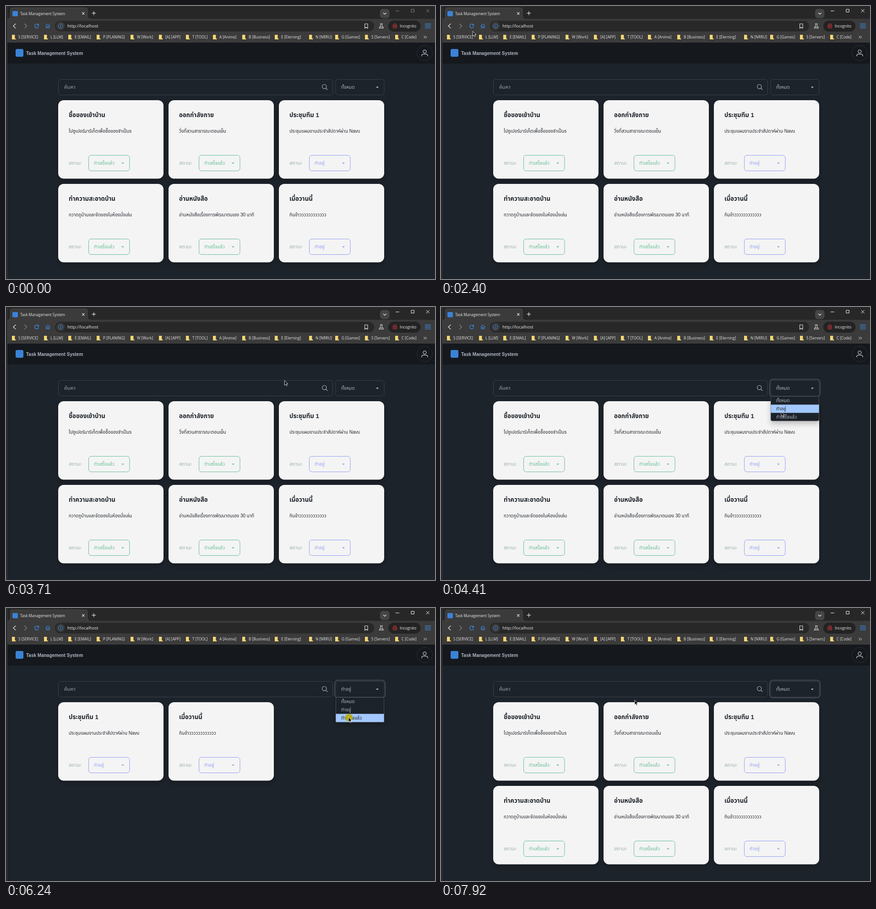
An HTML page that plays this animation: 937 by 597 pixels, repeating every 7.99 s.

```html
<!DOCTYPE html>
<html lang="th">
<head>
<meta charset="utf-8">
<title>Task board</title>
<style>
  html, body { margin: 0; width: 100%; height: 100%; overflow: hidden; background: #1d232a; }
  svg { display: block; width: 937px; height: 597px; }
  text { font-family: "Liberation Sans", "Noto Sans Thai Looped", "Noto Sans Thai", "Noto Sans", sans-serif; white-space: pre; }
  .ui { font-family: "Open Sans", "Noto Sans", sans-serif; }
  .line { fill: none; stroke-linecap: round; stroke-linejoin: round; }
</style>
</head>
<body>
<svg id="stage" viewBox="0 0 937 597" xmlns="http://www.w3.org/2000/svg">
  <defs>
    <filter id="soft" x="-20%" y="-20%" width="140%" height="150%">
      <feDropShadow dx="0" dy="6" stdDeviation="6" flood-color="#000" flood-opacity=".22"/>
    </filter>
  </defs>
</svg>
<script>
const LOOP = 7990;
const DONE = 'ทำเสร็จแล้ว', DOING = 'ทำอยู่', ALL = 'ทั้งหมด';
const OPTIONS = [ALL, DOING, DONE];
const stage = document.getElementById('stage');

function el(tag, attrs, parent = stage) {
  const node = document.createElementNS('http://www.w3.org/2000/svg', tag);
  for (const key in attrs) node.setAttribute(key, attrs[key]);
  parent.appendChild(node);
  return node;
}
const group = (parent) => el('g', {}, parent);
const rect = (x, y, width, height, rx, fill, parent, extra = {}) =>
  el('rect', { x, y, width, height, rx, fill, ...extra }, parent);
const path = (d, stroke, width, parent, extra = {}) =>
  el('path', { d, stroke, 'stroke-width': width, class: 'line', ...extra }, parent);
const circle = (cx, cy, r, fill, parent, extra = {}) =>
  el('circle', { cx, cy, r, fill, ...extra }, parent);
function text(str, x, y, size, fill, parent, extra = {}) {
  const node = el('text', { x, y, 'font-size': size, fill, ...extra }, parent);
  node.textContent = str;
  return node;
}
const show = (node, on) => node.setAttribute('display', on ? 'inline' : 'none');
const caret = (x, y, fill, parent) =>
  el('path', { d: `M${x - 3} ${y}h6l-3 3z`, fill }, parent);

// Browser window
const UI = { class: 'ui' };
const BLUE = '#3b8be6', PALE = '#e4e4e4';
rect(0, 0, 937, 597, 0, '#1d232a');
rect(0, 0, 937, 29, 0, '#272727');
rect(0, 28, 937, 52, 0, '#3b3b3b');
el('path', { d: 'M4 28.5Q9.5 28 9.5 22V9q0-5 5-5H173q5 0 5 5V22q0 6 6 6.5z', fill: '#3b3b3b', stroke: '#565656', 'stroke-width': .7 });
rect(3, 28.3, 934, 2, 0, '#3b3b3b');
rect(14, 11, 12, 11.5, 2, '#3b82d6');
text('Task Management System', 31, 19.8, 8.1, '#ececec', stage, UI);
path('M166.5 14l4.6 4.6m0-4.6l-4.6 4.6', PALE, 1.1);
path('M188 15.7h7.6m-3.8-3.8v7.6', PALE, 1.2);
rect(817, 6.5, 20.5, 20, 6, '#454545');
path('M824.4 15.2l2.9 2.8 2.9-2.8', PALE, 1.3);
const caption = path('M851.5 10.8h7M885.4 7.2h6v6h-6zM918 7.2l6.4 6.4m0-6.4l-6.4 6.4', '#fff', 1);

path('M21 39l-5 4.7 5 4.7', PALE, 1.3);
path('M40.5 39l5 4.7-5 4.7', '#858585', 1.2);
const reloadHover = circle(67, 43.7, 11.3, '#717171');
const reloadIcon = path('M70.7 41.4a4.3 4.3 0 1 0 .5 3.5M71.2 39.5v2.8h-2.8', BLUE, 1.3);
const stopIcon = path('M63.8 40.4l6.6 6.6m0-6.6l-6.6 6.6', BLUE, 1.3);
path('M87 43.2l4.4-4 4.4 4M88 42.6v5.4h2.2v-3.2h2.4V48h2.2v-5.4', BLUE, 1.1);
rect(107, 32.5, 697, 23, 11.5, '#282828');
circle(119.3, 43.8, 9.2, '#3a3a3a');
circle(119.3, 43.8, 4.7, 'none', stage, { stroke: BLUE, 'stroke-width': 1 });
path('M119.3 43.4v2.4M119.3 41.5v.1', BLUE, 1.1);
text('http://localhost', 134, 47.2, 9.5, '#f1f1f1', stage, UI);
path('M783.6 39h6.4v10l-3.2-2.6-3.2 2.6z', PALE, 1.1);
path('M817.3 39h5M818.3 39v3.8l-3.5 5.6h10l-3.5-5.6V39M816.5 45.7h6.6', PALE, 1);
rect(835, 32, 70.5, 24, 12, '#232323');
path('M844.2 43.3h10.2M846 43l1-3.6h4.6l1 3.6z', '#d3333c', 1.1);
circle(846.7, 46.8, 1.8, 'none', stage, { stroke: '#d3333c' });
circle(851.9, 46.8, 1.8, 'none', stage, { stroke: '#d3333c' });
path('M848.5 46.4h1.6', '#d3333c', .8);
text('Incognito', 860, 46.8, 8.4, '#f1f1f1', stage, UI);
path('M915.5 39.5h12M915.5 43.7h12M915.5 47.9h12', BLUE, 1.4);

const BOOKMARKS = [
  [27, 'S [SERVICE]'], [97, 'L [LLM]'], [150, 'E [EMAIL]'], [212, 'P [PLANING]'], [286, 'W [Work]'],
  [348, '[A] [APP]'], [407, 'T [TOOL]'], [466, 'A [Anime]'], [530, 'B [Business]'], [601, 'E [Elerning]'],
  [676, 'N [NRRU]'], [733, 'G [Games]'], [798, 'S [Servers]'], [864, 'C [Code]']
];
for (const [x, name] of BOOKMARKS) {
  el('path', { d: `M${x - 14} 63h6.4v8h2v2h-8.4z`, fill: '#f7d774' });
  text(name, x, 71, 8.2, '#e6e6e6', stage, UI);
}
path('M912.8 65.6l2.4 2.4-2.4 2.4m3.6-4.8l2.4 2.4-2.4 2.4', PALE, 1);

// Page header
rect(3, 80, 934, 46, 0, '#15191e');
const logo = group();
const logoHover = rect(11, 86, 168, 34, 6, '#32363c', logo);
rect(21, 94, 17, 17, 3, '#3b82d6', logo);
text('Task Management System', 44, 106.6, 10, '#b0b6c3', logo, { 'font-weight': 700 });
circle(914.5, 102.8, 16.7, '#15191e', stage, { stroke: '#2c323a', 'stroke-width': 1 });
circle(914.5, 99.6, 3.5, 'none', stage, { stroke: '#c0c5cf', 'stroke-width': 1.3 });
path('M908 109.6v-1q0-3.3 3.4-3.3h6.2q3.4 0 3.4 3.3v1', '#c0c5cf', 1.3);

// Search row
const BORDER = { stroke: '#3a4149', 'stroke-width': 1 };
rect(114.5, 160.5, 599, 34, 5.5, '#1d232a', stage, BORDER);
text('ค้นหา', 127, 181, 11.2, '#9aa2b0');
circle(695.3, 176.2, 4.7, 'none', stage, { stroke: '#b0b6c3', 'stroke-width': 1.1 });
path('M698.8 179.8l3.2 3.2', '#b0b6c3', 1.1);

// Task cards
const TASKS = [
  ['ซื้อของเข้าบ้าน', 'ไปซูเปอร์มาร์เก็ตเพื่อซื้อของจำเป็นs', DONE],
  ['ออกกำลังกาย', 'วิ่งที่สวนสาธารณะตอนเย็น', DONE],
  ['ประชุมทีม 1', 'ประชุมแผนงานประจำสัปดาห์ผ่าน Navu', DOING],
  ['ทำความสะอาดบ้าน', 'กวาดถูบ้านและจัดของในห้องนั่งเล่น', DONE],
  ['อ่านหนังสือ', 'อ่านหนังสือเรื่องการพัฒนาตนเอง 30 นาที', DONE],
  ['เมื่อวานนี้', 'กินข้า' + 'ว'.repeat(12), DOING]
];
const cards = TASKS.map(([title, note, status]) => {
  const node = group();
  const tint = status === DONE ? '#66bd96' : '#939bf5';
  rect(0, 0, 230, 171.5, 12, '#f4f4f4', node, { filter: 'url(#soft)' });
  text(title, 23, 37, 13.3, '#1d232a', node, { 'font-weight': 700 });
  text(note, 23, 70.8, 10, '#23282f', node);
  text('สถานะ', 23, 141, 11.1, '#9db0b0', node, { 'font-weight': 500 });
  rect(66.5, 120.5, 89.5, 34, 5.5, 'none', node, { stroke: tint, 'stroke-width': 1 });
  text(status, 78, 141, 10, tint, node);
  caret(141, 136.5, tint, node);
  return { node, status };
});

// Filter control
const ring = rect(717.8, 157.8, 110.4, 38.6, 7.5, 'none', stage, { stroke: '#535a63', 'stroke-width': 1.3 });
rect(720, 160.5, 106, 34, 5.5, '#1d232a', stage, BORDER);
const filterLabel = text('', 732, 181, 10, '#b0b6c3');
caret(811, 176.5, '#c3c8d1');

const popup = group();
rect(720.4, 195.5, 105.2, 53.5, 3, '#1d232a', popup, { stroke: '#4b5058', 'stroke-width': 1, filter: 'url(#soft)' });
const choices = group(popup);
const bar = rect(720.4, 0, 105.2, 18, 0, '#a2c8ff', choices);
const choiceText = OPTIONS.map((name, i) => text(name, 732, 208.3 + 18 * i, 10, '#b0b6c3', choices));

rect(0, 0, 2, 597, 0, '#222426');
rect(2, 0, 1, 597, 0, '#3a3d40');

// Pointer
const pointer = group();
const halo = circle(1, 1, 8.5, '#b9ad08', pointer, { 'fill-opacity': .9 });
const arrow = el('path', {
  d: 'M0 0V10.2L2.4 8 4 11.8 5.9 11 4.3 7.3H7.5z',
  fill: '#0c0c0c', stroke: '#fff', 'stroke-width': .8, 'stroke-linejoin': 'round'
}, pointer);
const hand = el('path', {
  d: 'M-.8.6Q.2-.8 1.2.6V4Q2.3 3.2 2.9 4.3 4 3.6 4.6 4.7 6.2 4.3 6.2 6V8.2Q6.2 9.4 5.3 11H.6L-2.6 7Q-3.2 5.6-1.8 5.6L-.8 6.4z',
  fill: '#fff', stroke: '#111', 'stroke-width': .7, 'stroke-linejoin': 'round'
}, pointer);

// Time, x, y
const ROUTE = [
  [120, 822, 572], [260, 713, 536], [460, 713, 536], [1230, 62, 45.5], [2260, 62, 45.5],
  [2800, 105, 103], [3380, 105, 103], [3860, 758, 178], [4050, 758, 178], [4400, 743, 229],
  [4830, 743, 229], [5270, 759, 178], [5480, 759, 178], [6040, 748, 239], [6570, 748, 239],
  [6900, 764, 183], [7080, 764, 183], [7320, 748, 205], [7620, 748, 205], [7920, 423, 201.5]
];
const CLICKS = [[1300, 1440], [3000, 3170], [3910, 4050], [4700, 4810], [5290, 5430], [6240, 6330], [6990, 7110], [7580, 7670]];
const OPEN = [[4040, 4740], [5330, 6270], [7080, 7630]];
const LOADING = [[1400, 1640], [3140, 3300]];
const BLANK = [[1580, 1640], [3240, 3300]];

const within = (t, spans) => spans.find(([a, b]) => t >= a && t < b);
const inBox = ([x, y], left, top, right, bottom) => x >= left && x <= right && y >= top && y <= bottom;

function place(t) {
  const next = ROUTE.findIndex(p => p[0] > t);
  if (next < 0) return ROUTE[ROUTE.length - 1].slice(1);
  if (next === 0) return ROUTE[0].slice(1);
  const [t0, x0, y0] = ROUTE[next - 1], [t1, x1, y1] = ROUTE[next];
  const u = (t - t0) / (t1 - t0), e = u * u * (3 - 2 * u);
  return [x0 + (x1 - x0) * e, y0 + (y1 - y0) * e];
}

function popScale(t) {
  for (const [, start] of LOADING) {
    const u = (t - start) / 250;
    if (u >= 0 && u < .4) return .98 + .1 * u;
    if (u >= .4 && u < 1) return 1.02 - (u - .4) / 30;
  }
  return 1;
}

function currentFilter(t) {
  if (t < 4780 || t >= 7650) return ALL;
  return t < 6310 ? DOING : DONE;
}

function draw(t) {
  const at = place(t), pressed = within(t, CLICKS), opened = within(t, OPEN);
  const overLogo = inBox(at, 12, 86, 178, 120);
  const overFilter = inBox(at, 720, 160, 826, 194);
  const filter = currentFilter(t);

  caption.setAttribute('stroke', t < 1300 ? '#858585' : '#fff');
  const loading = within(t, LOADING);
  show(reloadHover, inBox(at, 56, 33, 78, 55));
  show(reloadIcon, !loading);
  show(stopIcon, loading);

  show(logoHover, overLogo);
  const scale = overLogo && pressed ? .98 : popScale(t);
  logo.setAttribute('transform', `translate(95 103) scale(${scale}) translate(-95 -103)`);

  let slot = 0;
  const blank = within(t, BLANK);
  for (const { node, status } of cards) {
    const on = !blank && (filter === ALL || filter === status);
    show(node, on);
    if (!on) continue;
    node.setAttribute('transform', `translate(${114 + 241 * (slot % 3)} ${206 + 183 * Math.floor(slot / 3)})`);
    slot++;
  }

  show(ring, t >= 3950);
  filterLabel.textContent = filter;
  show(popup, opened);
  if (opened) {
    show(choices, t - opened[0] >= 60);
    const row = Math.floor((at[1] - 195) / 18);
    const active = row >= 0 && row < 3 ? row : OPTIONS.indexOf(filter);
    bar.setAttribute('y', 195.5 + 18 * active);
    choiceText.forEach((node, i) => node.setAttribute('fill', i === active ? '#1d232a' : '#b0b6c3'));
  }

  show(pointer, t >= 120);
  pointer.setAttribute('transform', `translate(${at[0]} ${at[1]})`);
  const pointing = overLogo || overFilter;
  show(hand, pointing);
  show(arrow, !pointing);
  show(halo, pressed);
}

const start = performance.now();
function tick() {
  draw((performance.now() - start) % LOOP);
  requestAnimationFrame(tick);
}
draw(0);
requestAnimationFrame(tick);
</script>
</body>
</html>
```
